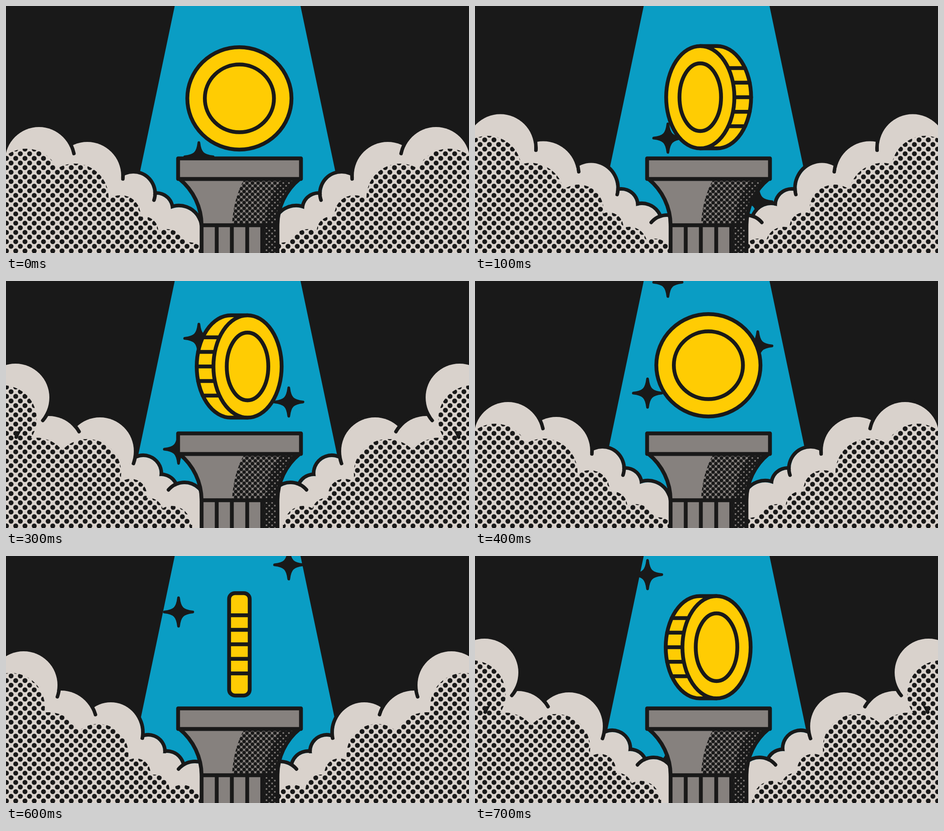
An HTML page with a canvas that plays this animation: 1025x547 px, repeating every 0.8 s.

```html
<!DOCTYPE html>
<html lang="en">
<head>
<meta charset="utf-8">
<title>Coin over a column</title>
<style>
  html, body { margin: 0; width: 100%; height: 100%; overflow: hidden; background: #191919; }
  canvas { display: block; }
</style>
</head>
<body>
<canvas id="stage" width="1025" height="547"></canvas>
<script>
const W = 1025, H = 547, STEP = 100, STEPS = 8;
const INK = '#191919', BLUE = '#0a9dc4', GOLD = '#ffcc03', CLOUD = '#d9d2cc', STONE = '#86817e';
const ctx = document.getElementById('stage').getContext('2d');
const rad = deg => deg * Math.PI / 180;

// Cloud poses: each puff is [x, y, outline radius, outline end angle].
const rest = [[73, 343, 79, -12], [180, 376, 79, 5], [282, 415, 48, 18], [333, 450, 36, -10], [383, 492, 50, 0], [432, 515, 44, 0]];
const half = [[39, 286, 79, 19], [122, 373, 79, -16], [232, 391, 71, 10], [315, 433, 37, 0], [356, 470, 38, -10], [418, 502, 47, 0]];
const high = [[21, 258, 79, 40], [95, 372, 77, -30], [208, 377, 79, 20], [304, 426, 40, 3], [343, 465, 37, -20], [395, 492, 46, 0]];
const mix = (a, b) => a.map((p, i) => p.map((v, j) => (v + b[i][j]) / 2));
const poses = [rest, mix(rest, half), half, high];

// Stars rise in whole units and wrap around.
const rise = [0, 1, 3, 5, 8, 9, 11, 13];
const UNIT = 41.4, LAP = 16 * UNIT;
const stars = [[427, 334], [626, 475], [382, 579.5]];
const starShape = new Path2D('M0-31.5C2.5-9 9-2.5 31.5 0C9 2.5 2.5 9 0 31.5C-2.5 9-9 2.5-31.5 0C-9-2.5-2.5-9 0-31.5Z');

const bell = new Path2D('M384 383A132.8 132.8 0 0 1 433 485.5H601A132.8 132.8 0 0 1 650 383Z');
const shade = new Path2D('M528 383Q503 425 500 490H660V383Z');
const deepShade = new Path2D('M612 383Q576 425 573 490H660V383Z');
const flute = new Path2D('M568 486H602V560H568Z');

function ink(width) {
  ctx.strokeStyle = INK;
  ctx.lineWidth = width;
  ctx.lineCap = ctx.lineJoin = 'round';
}

function line(x1, y1, x2, y2) {
  ctx.beginPath();
  ctx.moveTo(x1, y1);
  ctx.lineTo(x2, y2);
  ctx.stroke();
}

function disc(x, y, r) {
  ctx.beginPath();
  ctx.arc(x, y, r, 0, 2 * Math.PI);
  ctx.fill();
}

// Staggered dots filling a box
function dots(x0, y0, x1, y1, gap, r) {
  ctx.fillStyle = INK;
  ctx.beginPath();
  for (let row = 0, y = y0; y < y1 + r; row++, y += gap / 2) {
    for (let x = x0 + (row % 2) * gap / 2; x < x1 + r; x += gap) {
      ctx.moveTo(x + r, y);
      ctx.arc(x, y, r, 0, 2 * Math.PI);
    }
  }
  ctx.fill();
}

const cloudDots = () => dots(-19.5, 214.4, 440, H, 20.5, 5.4);
const stoneDots = r => dots(496.1, 379.7, 660, H, 12.4, r);

function clipped(path, paint) {
  ctx.save();
  ctx.clip(path);
  paint();
  ctx.restore();
}

function beam() {
  ctx.fillStyle = BLUE;
  ctx.fill(new Path2D('M373.5 0H652L767 547H259Z'));
}

function star(x, y) {
  ctx.save();
  ctx.translate(x, y);
  ink(6);
  ctx.fillStyle = INK;
  ctx.fill(starShape);
  ctx.stroke(starShape);
  ctx.restore();
}

function cloudMass(puffs, dx, dy) {
  const path = new Path2D();
  path.moveTo(-20 + dx, puffs[0][1] + dy);
  for (const [x, y] of puffs) path.lineTo(x + dx, y + dy);
  path.lineTo(440 + dx, puffs[5][1] + dy);
  path.lineTo(440 + dx, H + 60);
  path.lineTo(-20 + dx, H + 60);
  path.closePath();
  return path;
}

function cloudShade(puffs, dx, dy) {
  // Wound the same way as the mass so the union stays solid.
  const path = cloudMass(puffs, dx, dy);
  for (const [x, y, r] of puffs) {
    path.moveTo(x + dx + r - 4, y + dy);
    path.arc(x + dx, y + dy, r - 4, 0, 2 * Math.PI);
  }
  return path;
}

function cloud(pose) {
  const puffs = poses[pose];
  const order = pose ? [4, 3, 2, 1, 0, 5] : [5, 4, 3, 2, 1, 0];
  ctx.fillStyle = CLOUD;
  ctx.fill(cloudMass(puffs, 0, 0));
  for (const i of order) {
    const [x, y, r, end] = puffs[i];
    ink(8);
    ctx.beginPath();
    ctx.arc(x, y, r, rad(pose && i === 5 ? -140 : -160), rad(end));
    ctx.stroke();
    disc(x, y, r - 4);
  }
  clipped(cloudShade(puffs, -28, 48), cloudDots);
}

function clouds(pose) {
  cloud(pose);
  ctx.save();
  ctx.translate(W, 0);
  ctx.scale(-1, 1);
  cloud(pose);
  ctx.restore();
}

function column() {
  ctx.fillStyle = STONE;
  ctx.fillRect(433, 485, 168, 70);
  ctx.fill(bell);
  clipped(bell, () => {
    clipped(shade, () => stoneDots(3.9));
    clipped(deepShade, () => stoneDots(4.7));
  });
  clipped(flute, () => stoneDots(4.7));
  ctx.fillStyle = INK;
  ctx.fillRect(563, 486, 9, 70);
  ink(8.5);
  ctx.stroke(bell);
  for (const x of [433, 466.5, 500, 534, 601]) line(x, 486, x, 560);
  ctx.fillStyle = STONE;
  ctx.fillRect(381, 337.6, 272, 45.4);
  ctx.strokeRect(381, 337.6, 272, 45.4);
}

function ring(x, y, rx, ry) {
  ctx.beginPath();
  ctx.ellipse(x, y, rx, ry, 0, 0, 2 * Math.PI);
  ctx.fill();
  ctx.stroke();
}

function coinFront() {
  ring(0, 0, 115.3, 113.3);
  ring(0, 0, 76.5, 75);
}

function coinEdge() {
  ctx.beginPath();
  ctx.roundRect(-22.8, -113.3, 45.6, 226.6, 13);
  ctx.fill();
  ctx.stroke();
  for (let i = -2; i <= 2; i++) line(-22, i * 32.2, 22, i * 32.2);
}

function coinTurned() {
  const rx = 75.5, ry = 113.3, back = -19, face = 18;
  ctx.beginPath();
  ctx.ellipse(back, 0, rx, ry, 0, Math.PI / 2, Math.PI * 1.5);
  ctx.lineTo(face, -ry);
  ctx.lineTo(face, ry);
  ctx.closePath();
  ctx.fill();
  ctx.stroke();
  for (let i = -2; i <= 2; i++) {
    const y = i * 32.2, reach = rx * Math.sqrt(1 - (y / ry) ** 2);
    line(back - reach, y, face - reach, y);
  }
  ring(face, 0, rx, ry);
  ring(face, 0, 46, 75);
}

function coin(step) {
  const turn = step % 4;
  ctx.save();
  ctx.translate(516.7, 195.6 + 9 * Math.cos(2 * Math.PI * step / STEPS));
  if (turn === 1) ctx.scale(-1, 1);
  ink(8.5);
  ctx.fillStyle = GOLD;
  [coinFront, coinTurned, coinEdge, coinTurned][turn]();
  ctx.restore();
}

function draw(step) {
  ctx.fillStyle = INK;
  ctx.fillRect(0, 0, W, H);
  beam();
  for (const [x, y] of stars) {
    const shift = (y - UNIT * rise[step] + 70 + LAP) % LAP;
    star(x, shift - 70);
  }
  clouds(step % 4);
  column();
  coin(step);
}

let shown = -1;
function tick() {
  const step = Math.floor(performance.now() / STEP) % STEPS;
  if (step !== shown) draw(shown = step);
  requestAnimationFrame(tick);
}
tick();
</script>
</body>
</html>
```
